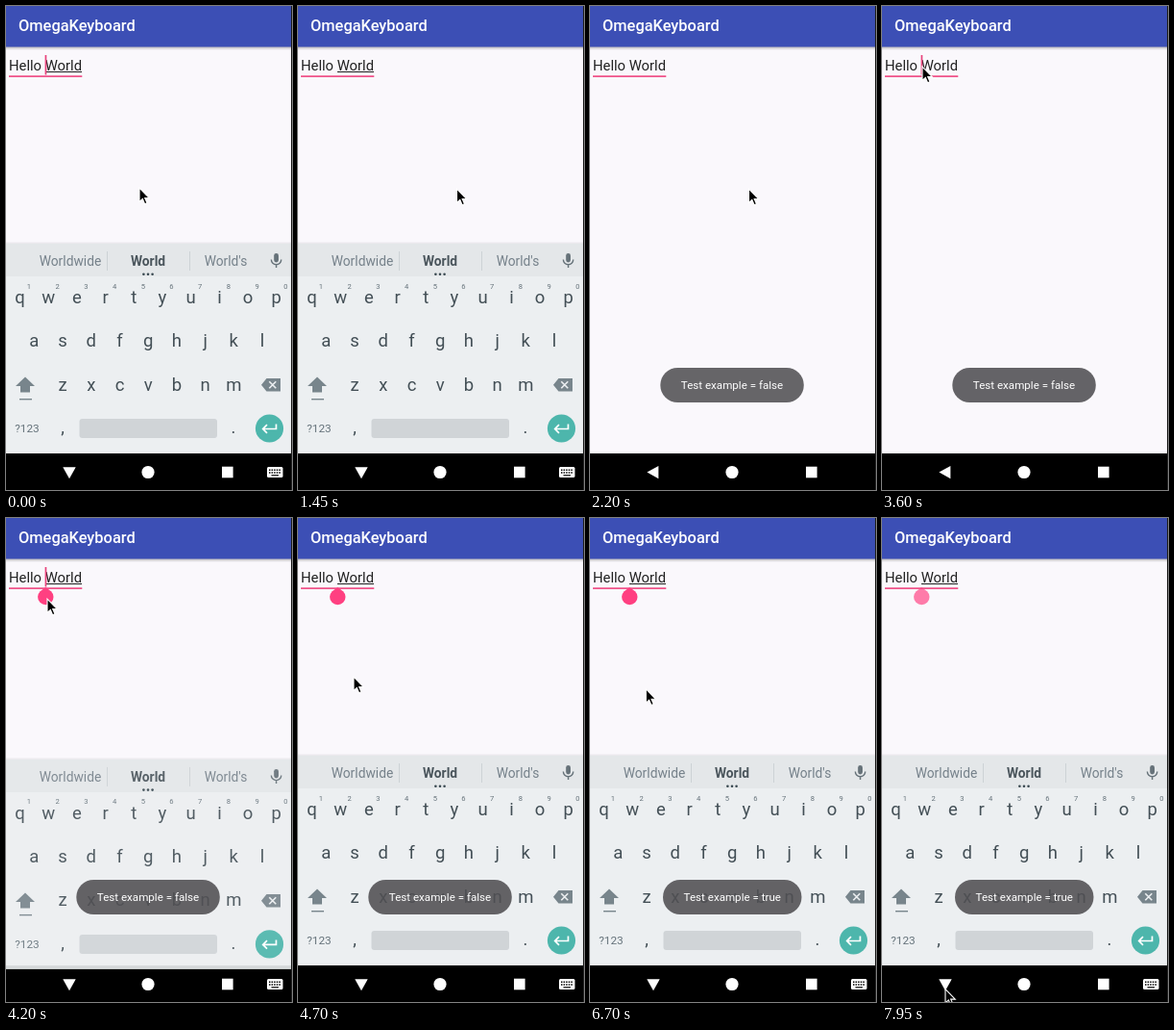
An HTML page for the animation above (8 s loop, 298 px wide and 503 px high).

```html
<!DOCTYPE html>
<html lang="en">
<head>
<meta charset="utf-8">
<title>Keyboard demo</title>
<style>
  html, body { margin: 0; width: 100%; height: 100%; overflow: hidden; background: #faf8fc; }
  svg { display: block; width: 298px; height: 503px; font-family: Roboto, sans-serif; }
</style>
</head>
<body>
<svg viewBox="0 0 298 503">
  <defs>
    <linearGradient id="shade" x2="0" y2="1">
      <stop stop-color="#000" stop-opacity=".28"/>
      <stop offset="1" stop-color="#000" stop-opacity="0"/>
    </linearGradient>
  </defs>

  <rect width="298" height="503" fill="#faf8fc"/>
  <rect y="42" width="298" height="4" fill="url(#shade)"/>
  <rect width="298" height="42.5" fill="#3c4fb5"/>
  <text x="13" y="26" font-size="16.4" font-weight="500" fill="#fff">OmegaKeyboard</text>

  <text x="3" y="67" font-size="14.8" fill="#212121">Hello World</text>
  <rect id="composing" x="41" y="68" width="38" height="1" fill="#212121"/>
  <rect x="3" y="72.3" width="76.3" height="1.6" fill="#f0447f"/>
  <rect id="caret" x="40.6" y="51" width="1.7" height="20.5" fill="#e8437c"/>
  <path id="handle" d="M41.3 72 L47 76.2 A8.2 8.2 0 1 1 35.6 76.2 Z" fill="#ff4081"/>

  <rect y="465" width="298" height="38" fill="#000"/>

  <g id="keyboard">
    <rect y="245.5" width="298" height="2" fill="#000" opacity=".06"/>
    <rect y="247" width="298" height="218" fill="#eceff1"/>
    <rect y="247" width="298" height="34" fill="#e4e7e9"/>
    <path d="M105.5 255V275M191.5 255V275" stroke="#cdd2d5"/>
    <g text-anchor="middle" font-size="13.8" fill="#75818a">
      <text x="67" y="270">Worldwide</text>
      <text x="148" y="270" font-weight="700" fill="#4a555c">World</text>
      <text x="229" y="270">World's</text>
    </g>
    <g fill="#37474f">
      <circle cx="143.4" cy="278.7" r="1.3"/>
      <circle cx="148" cy="278.7" r="1.3"/>
      <circle cx="152.6" cy="278.7" r="1.3"/>
    </g>
    <rect x="279.2" y="257" width="4.8" height="9.5" rx="2.4" fill="#667279"/>
    <path d="M276.4 263.5a5.2 5.2 0 0 0 10.4 0M281.6 268.7V272" fill="none" stroke="#667279" stroke-width="1.4"/>
    <g id="keys" text-anchor="middle" font-size="18.5" fill="#434f56"></g>
    <path d="M20 385.5L30 395H25V401.5H15V395H10Z" fill="#78858c"/>
    <rect x="14" y="408" width="13" height="1.4" fill="#78858c"/>
    <path d="M266 393.8L271.5 387H286V400.5H271.5Z" fill="#78858c"/>
    <path d="M274.3 390.3l7 7m0-7l-7 7" stroke="#eceff1" stroke-width="1.6"/>
    <text x="22" y="443" text-anchor="middle" font-size="11.8" fill="#65727a">?123</text>
    <rect x="76.5" y="429" width="143.5" height="20" rx="3" fill="#d0d4d7"/>
    <circle cx="274.5" cy="439" r="14.6" fill="#4db6ac"/>
    <path d="M281.5 434.5V439.5H268M272 435.2L267.7 439.5L272 443.8" fill="none" stroke="#fff" stroke-width="1.7"/>
  </g>

  <g fill="#fff">
    <path id="back" d="M-6.6 0L5.4 -6.7V6.7Z"/>
    <circle cx="148" cy="484.5" r="6.6"/>
    <rect x="225" y="478.7" width="11.6" height="11.6"/>
  </g>
  <g id="switcher">
    <rect x="272" y="479" width="16.5" height="11" rx="1.5" fill="#fff"/>
    <path d="M274 482.3H287M274 485H287" stroke="#000" stroke-width="1.5" stroke-dasharray="1.5 1.1"/>
    <path d="M276.5 487.8H284" stroke="#000" stroke-width="1.2"/>
  </g>

  <g text-anchor="middle" font-size="11.6" fill="#fff">
    <g id="toastFalse">
      <rect x="73.3" y="376" width="149.5" height="36" rx="18" fill="#504f52" fill-opacity=".88"/>
      <text x="148" y="398.4">Test example = false</text>
    </g>
    <g id="toastTrue">
      <rect x="76" y="376" width="144.5" height="36" rx="18" fill="#504f52" fill-opacity=".88"/>
      <text x="148.3" y="398.4">Test example = true</text>
    </g>
  </g>
  <rect x="297" width="1" height="503" fill="#1c1c1c"/>
  <path id="pointer" d="M0 0V14.5L3.3 11.5L5.6 16.8L8 15.8L5.7 10.6H10.3Z" fill="#000" stroke="#fff" stroke-width="1.1"/>
</svg>

<script>
const LOOP = 8000;
const KEY_PITCH = 29.7;
const $ = id => document.getElementById(id);

function addKey(label, x, y, extra = {}) {
  const key = document.createElementNS("http://www.w3.org/2000/svg", "text");
  Object.entries({ x, y, ...extra }).forEach(([name, value]) => key.setAttribute(name, value));
  key.textContent = label;
  $("keys").append(key);
}

[["qwertyuiop", 14.5, 309], ["asdfghjkl", 29.4, 354.3], ["zxcvbnm", 59.1, 399.5]]
  .forEach(([letters, left, y]) =>
    [...letters].forEach((letter, i) => addKey(letter, left + i * KEY_PITCH, y)));
[..."1234567890"].forEach((digit, i) =>
  addKey(digit, 24 + i * KEY_PITCH, 293.5, { "font-size": 7.6, fill: "#65727a" }));
addKey(",", 59, 444);
addKey(".", 237, 444);

const progress = (t, start, length) => Math.min(1, Math.max(0, (t - start) / length));
const easeIn = p => p * p;
const easeOut = p => 1 - (1 - p) ** 2;
const easeInOut = p => p * p * (3 - 2 * p);

// Pointer stops: time, x, y
const stops = [
  [0, 139, 189], [700, 165.5, 190], [2400, 165.5, 190], [3250, 67, 63], [3450, 67, 63],
  [3600, 42, 63], [3950, 42, 63], [4180, 43, 84], [4250, 43, 84], [4700, 58, 165],
  [6600, 58, 165], [7450, 66, 489.5], [LOOP, 66, 489.5]
];

function pointerAt(t) {
  const i = stops.findIndex(stop => stop[0] > t);
  const [start, x0, y0] = stops[i - 1];
  const [end, x1, y1] = stops[i];
  const p = easeInOut(progress(t, start, end - start));
  return [x0 + (x1 - x0) * p, y0 + (y1 - y0) * p];
}

// Blinks every 500 ms; the tap restarts the cycle
function caretVisible(t) {
  return t < 4100 ? (t + 400) % 1000 < 500 : (t - 4100) % 1000 < 500;
}

function draw(t) {
  const hide = easeIn(progress(t, 1620, 180));
  const show = easeOut(progress(t, 4060, 200));
  const keyboard = t < 3000 ? 1 - hide : show;
  $("keyboard").setAttribute("opacity", keyboard);
  $("keyboard").setAttribute("transform", `translate(0 ${45 * (1 - keyboard)})`);

  const open = t < 3000 ? 1 - progress(t, 1640, 150) : progress(t, 4020, 150);
  $("back").setAttribute("transform", `translate(66 484.6) rotate(${-90 * open})`);
  $("switcher").setAttribute("opacity", open);
  $("composing").setAttribute("opacity", +(t < 1700 || t >= 4100));

  $("caret").setAttribute("opacity", +caretVisible(t));
  $("handle").setAttribute("opacity", t < 3950 ? 0 : 1 - 0.32 * progress(t, 7850, 100));

  const falseOut = easeIn(progress(t, 5150, 500));
  $("toastFalse").setAttribute("opacity", easeOut(progress(t, 1800, 450)) * (1 - falseOut));
  $("toastTrue").setAttribute("opacity", easeOut(progress(t, 5250, 500)));

  $("pointer").setAttribute("transform", `translate(${pointerAt(t)})`);
}

function tick() {
  draw(performance.now() % LOOP);
  requestAnimationFrame(tick);
}
tick();
</script>
</body>
</html>
```
